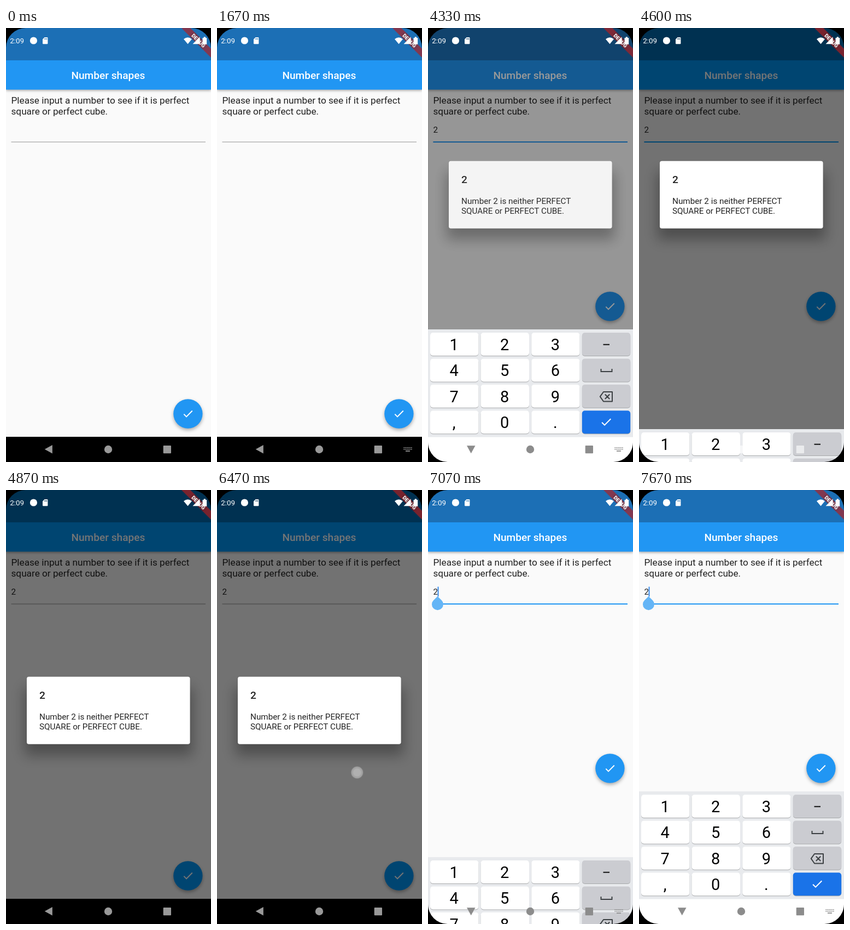
Write an HTML page that moves like this. It is 375 px wide and 792 px high and loops after 8 s.

```html
<!DOCTYPE html>
<html lang="en">
<head>
<meta charset="utf-8">
<title>Number shapes</title>
<style>
html, body { margin: 0; width: 100%; height: 100%; overflow: hidden; background: #000; }
svg { display: block; width: 375px; height: 792px; font-family: Roboto, "Noto Sans", sans-serif; }

/* Every animation is one 8 s loop, held between 15 fps ticks. */
.fab, .focus, .caret, .typed, .handle, .scrim, .dialog, .move, .keyboard,
.nav, .back, .ime, .tap, .pressed, .blue, .status { animation: 8s step-end infinite; }

.body { font-size: 17.2px; fill: #212121; }
.small { font-size: 15.28px; fill: #212121; }
.bar { filter: drop-shadow(0 2px 2px rgba(0,0,0,.3)); }
.title { font-size: 19.1px; font-weight: 500; fill: #fff; text-anchor: middle; }
.key { filter: drop-shadow(0 1px .4px rgba(0,0,0,.28)); }
.digit { font-size: 29px; text-anchor: middle; fill: #000; }
.banner { font-size: 9.74px; font-weight: 900; fill: #fff; text-anchor: middle; filter: drop-shadow(0 0 2px rgba(0,0,0,.5)); }
.line { fill: none; stroke-width: 2; }

/* The blues turn purer while the scrim is at full strength. */
.blue { animation-name: blue; }
@keyframes blue {
  0%, 85%, 100% { fill: #2196f3; }
  55% { fill: #0098f8; }
}
.status { animation-name: status; }
@keyframes status {
  0%, 85%, 100% { fill: #1c6fb5; }
  55% { fill: #006cb2; }
}
.fab { animation-name: fab; filter: drop-shadow(0 3px 3px rgba(0,0,0,.32)); }
@keyframes fab {
  0%, 59.125%, 100% { transform: none; }
  28.375%, 88.375% { transform: translateY(-196px); }
}
.focus { animation-name: focus; }
@keyframes focus {
  0% { opacity: 0; }
  27.5% { opacity: .35; }
  28.375% { opacity: .7; }
  29.125% { opacity: 1; }
  59.125% { opacity: .65; }
  60% { opacity: .3; }
  60.875% { opacity: 0; }
  85.875% { opacity: .3; }
  86.625% { opacity: .65; }
  87.5%, 100% { opacity: 1; }
}
.caret { animation-name: caret; }
@keyframes caret {
  0% { opacity: 0; transform: translateX(-8px); }
  27.5% { opacity: 1; transform: translateX(-8px); }
  38.375% { opacity: 0; transform: translateX(-8px); }
  44.125% { opacity: 1; transform: translateX(-8px); }
  45% { opacity: 1; transform: none; }
  53.375% { opacity: 0; transform: none; }
  85% { opacity: 1; transform: none; }
  90.875% { opacity: 0; transform: none; }
  95.875%, 100% { opacity: 1; transform: none; }
}
.typed { animation-name: typed; }
@keyframes typed {
  0% { opacity: 0; }
  45%, 100% { opacity: 1; }
}
.handle { animation-name: handle; }
@keyframes handle {
  0% { opacity: 0; }
  86.625% { opacity: .5; }
  87.5%, 100% { opacity: 1; }
}
.scrim { animation-name: scrim; }
@keyframes scrim {
  0% { opacity: 0; }
  53.375% { opacity: .16; }
  54.125% { opacity: .4; }
  55% { opacity: .54; }
  85% { opacity: .304; }
  85.875%, 100% { opacity: 0; }
}
.dialog { animation-name: dialog; }
@keyframes dialog {
  0% { opacity: 0; }
  53.375% { opacity: .45; }
  54.125% { opacity: .9; }
  55% { opacity: 1; }
  85% { opacity: .49; }
  85.875%, 100% { opacity: 0; }
}
.move { animation-name: move; }
@keyframes move {
  0% { transform: translateY(-98px); }
  59.125% { transform: translateY(-60px); }
  60% { transform: translateY(-10px); }
  60.875%, 100% { transform: none; }
}
.keyboard { animation-name: keyboard; }
@keyframes keyboard {
  0% { transform: translateY(250px); }
  27.5% { transform: translateY(215px); }
  28.375% { transform: translateY(140px); }
  29.125% { transform: translateY(74px); }
  30% { transform: translateY(30px); }
  30.875% { transform: translateY(8px); }
  31.625% { transform: none; }
  55.875% { transform: translateY(30px); }
  56.625% { transform: translateY(98px); }
  57.5% { transform: translateY(182px); }
  58.375% { transform: translateY(250px); }
  87.5% { transform: translateY(215px); }
  88.375% { transform: translateY(120px); }
  89.125% { transform: translateY(50px); }
  90% { transform: translateY(14px); }
  90.875%, 100% { transform: none; }
}
.nav { animation-name: nav; }
@keyframes nav {
  0%, 56.625% { fill: rgba(255,255,255,.6); }
  24.125%, 87.5%, 100% { fill: #8c8c8c; }
}
.back { animation-name: back; transform-origin: 78.5px 768.5px; }
@keyframes back {
  0%, 57.5% { transform: none; }
  24.125%, 87.5%, 100% { transform: rotate(-90deg); }
}
.ime { animation-name: ime; }
@keyframes ime {
  0%, 56.625% { opacity: 0; }
  20.875%, 85%, 100% { opacity: 1; }
}
.tap { animation-name: tap; }
@keyframes tap {
  0% { opacity: 0; transform: translate(136.5px,200.5px); }
  14.125% { opacity: 1; transform: translate(136.5px,200.5px); }
  15.875% { opacity: .5; transform: translate(136.5px,200.5px); }
  16.625% { opacity: 0; transform: translate(140px,582px); }
  44.125% { opacity: 1; transform: translate(140px,582px); }
  45.875% { opacity: .5; transform: translate(140px,582px); }
  46.625% { opacity: 0; transform: translate(334px,510px); }
  51.625% { opacity: 1; transform: translate(334px,510px); }
  53.375% { opacity: .5; transform: translate(334px,510px); }
  54.125% { opacity: 0; transform: translate(256.3px,515.5px); }
  80.875% { opacity: 1; transform: translate(256.3px,515.5px); }
  85% { opacity: .5; transform: translate(256.3px,515.5px); }
  85.875%, 100% { opacity: 0; transform: translate(256.3px,515.5px); }
}
.pressed { animation-name: pressed; }
@keyframes pressed {
  0%, 47.5%, 100% { opacity: 0; }
  44.125% { opacity: .1; }
}
</style>
</head>
<body>
<svg viewBox="0 0 375 792">
  <defs>
    <path id="check" d="M9 16.17 4.83 12 3.41 13.41 9 19 21 7 19.59 5.59z"/>
    <filter id="soft" x="-30%" y="-60%" width="160%" height="220%"><feGaussianBlur stdDeviation="12"/></filter>
  </defs>

  <rect width="375" height="792" fill="#fafafa"/>
  <rect class="bar blue" width="375" height="112.5" fill="#2196f3"/>
  <rect class="status" width="375" height="59" fill="#1c6fb5"/>
  <text class="title" x="186.9" y="93">Number shapes</text>
  <text class="body" x="9.5" y="138">Please input a number to see if it is perfect</text>
  <text class="body" x="9.5" y="158.2">square or perfect cube.</text>
  <text class="small typed" x="9.5" y="190.5">2</text>
  <rect x="9.5" y="207" width="355.5" height="2" fill="#c6c6c6"/>
  <g class="focus"><rect class="blue" x="9.5" y="207" width="355.5" height="2" fill="#2196f3"/></g>
  <rect class="caret" x="17.6" y="176.5" width="1.9" height="18" fill="#2f86ea"/>
  <path class="handle" d="M17.5 194 24.9 201.2A10.5 10.5 0 1 1 10.1 201.2z" fill="#64b5f6"/>
  <g class="fab">
    <circle class="blue" cx="332.9" cy="704" r="26.7" fill="#2196f3"/>
    <use href="#check" transform="translate(321.4 692.5) scale(.955)" fill="#fff"/>
  </g>

  <rect class="scrim" width="375" height="792"/>
  <g class="dialog">
    <g class="move">
      <rect x="34" y="361" width="307" height="123" opacity=".32" filter="url(#soft)"/>
      <rect x="38" y="340.8" width="298.6" height="123" rx="3.8" fill="#fff"/>
      <text x="61" y="381.2" font-size="19.1" font-weight="500" fill="#212121">2</text>
      <text class="small" x="61" y="419.3">Number 2 is neither PERFECT</text>
      <text class="small" x="61" y="437.2">SQUARE or PERFECT CUBE.</text>
    </g>
  </g>

  <rect y="746" width="375" height="46"/>
  <g class="keyboard">
    <rect y="550" width="375" height="197" fill="#e8eaed"/>
    <rect y="746.5" width="375" height="46" fill="#fff"/>
    <g id="keys"></g>
    <rect class="pressed" x="96.5" y="556" width="88.5" height="42" rx="5"/>
    <rect x="320.5" y="576.7" width="11.5" height="2" fill="#111"/>
    <path class="line" stroke="#3c4043" d="M316.5 622V627H336.5V622"/>
    <path class="line" stroke="#3c4043" stroke-linejoin="round" d="M321 664H337V681.5H321L314.8 672.7zM323.8 668.5 332.2 677M332.2 668.5 323.8 677"/>
    <use href="#check" transform="translate(314 707) scale(1 1)" fill="#fff"/>
  </g>

  <g class="nav">
    <path class="back" d="M70.7 768.8 84.8 761V776.6z"/>
    <circle cx="187" cy="769" r="7.2"/>
    <rect x="287.7" y="761.9" width="14.3" height="14.3" rx="1"/>
    <g class="ime" id="dots"><rect x="345" y="771.2" width="8" height="1.7"/></g>
  </g>

  <g transform="translate(375) rotate(45)">
    <rect x="-38.2" y="26.7" width="76.4" height="11.5" fill="#b71c1c" fill-opacity=".66"/>
    <text class="banner" y="35.9">DEBUG</text>
  </g>

  <g fill="#fff">
    <text x="7.3" y="28.2" font-size="13.4">2:09</text>
    <circle cx="50.4" cy="23" r="6.6"/>
    <path fill-rule="evenodd" d="M70.5 17H75.2Q76.4 17 76.4 18.2V28Q76.4 29.2 75.2 29.2H68.2Q67 29.2 67 28V20.5zM70.3 18.8V21H71.3V18.8zM72.2 18.8V21H73.2V18.8zM74.1 18.8V21H75.1V18.8z"/>
    <path d="M325 20.3Q332.5 14 340 20.3L332.5 29.3z"/>
    <path d="M341.5 29.3 354.5 16.3V29.3z"/>
    <path d="M359.5 18H361.7V16.3H365V18H367.2V29.7H359.5z"/>
  </g>

  <g class="tap">
    <circle r="10.4" fill="#fff" fill-opacity=".35" stroke="#b4b4b4" stroke-opacity=".45" stroke-width="1.4"/>
    <circle r="7.5" fill="#fff" fill-opacity=".15"/>
  </g>
  <path fill-rule="evenodd" d="M0 0H375V792H0zM36 0A36 36 0 0 0 0 36V756A36 36 0 0 0 36 792H339A36 36 0 0 0 375 756V36A36 36 0 0 0 339 0z"/>
</svg>
<script>
const add = (parent, tag, attrs, text = "") => {
  const el = document.createElementNS("http://www.w3.org/2000/svg", tag);
  for (const name in attrs) el.setAttribute(name, attrs[name]);
  el.textContent = text;
  parent.append(el);
};

const keys = document.getElementById("keys");
["123 ", "456 ", "789 ", ",0. "].forEach((row, r) => [...row].forEach((label, c) => {
  const x = 4 + c * 92.6, y = 556 + r * 47.4;
  const fill = c < 3 ? "#fff" : r < 3 ? "#cbccd1" : "#1a73e8";
  add(keys, "rect", { class: "key", x, y, width: 88.4, height: 42, rx: 5, fill });
  if (c < 3) add(keys, "text", { class: "digit", x: x + 43.6, y: y + 32 }, label);
}));

const dots = document.getElementById("dots");
for (let i = 0; i < 12; i++) {
  add(dots, "rect", { x: 341.5 + i % 6 * 2.7, y: i < 6 ? 765 : 768, width: 1.6, height: 1.7 });
}
</script>
</body>
</html>
```
